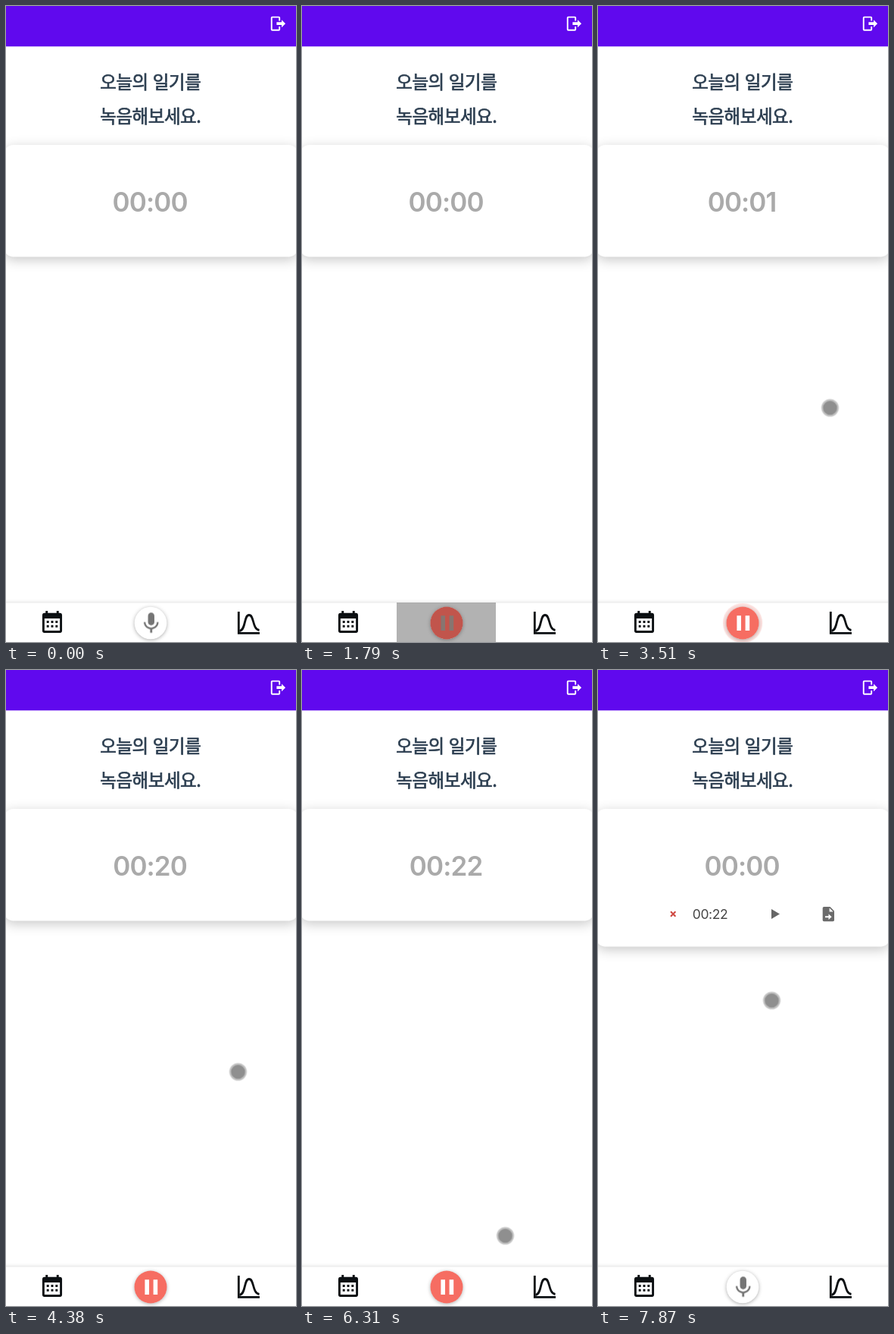
Recreate the animation shown at these times as an HTML page. Size 383 by 838 pixels, loop 8000 ms.

```html
<!DOCTYPE html>
<html lang="ko">
<head>
<meta charset="utf-8">
<title>음성 일기</title>
<style>
html, body { margin: 0; width: 100%; height: 100%; overflow: hidden; background: #fff; }
svg.stage { display: block; width: 100vw; height: 100vh; }

/* a thin stroke gives the regular weight a medium look */
.title {
  font: 400 23.5px "Noto Sans CJK KR", "Noto Sans CJK", sans-serif;
  letter-spacing: -.45px; fill: #2c3e50; stroke: #2c3e50; stroke-width: .7; text-anchor: middle;
}
.clock { font: 600 35px Inter, sans-serif; letter-spacing: -.9px; fill: #aaa; text-anchor: middle; }
.length { font: 400 17.5px Inter, sans-serif; letter-spacing: -.4px; fill: #444; text-anchor: middle; }
.card { fill: #fff; height: 147.5px; filter: drop-shadow(0 4px 8px rgba(0,0,0,.22)); }
.bar { fill: #fff; filter: drop-shadow(0 -1px 2px rgba(0,0,0,.12)); }
.knob { fill: #fff; filter: drop-shadow(0 1.5px 2.5px rgba(0,0,0,.33)); }

.card, .digits, .clip, .mic, .pause, .red, .press, .pulse, .cursor, .dot {
  animation: 8s linear infinite;
}
.card, .digits, .clip, .mic { animation-timing-function: step-end; }
.card { animation-name: grow; }
.digits { animation-name: count; }
.clip { animation-name: saved; }
.mic { animation-name: mic; fill: #757575; }
.pause { animation-name: pause; }
.red { animation-name: red; fill: #f66d62; }
.press { animation-name: press; }
.pulse { animation-name: pulse; fill: #f66d62; transform-origin: 191px 813px; }
.cursor { animation-name: move; }
.dot { animation-name: darken; }

@keyframes grow { 0% { height: 147.5px } 89.7%, 100% { height: 181.5px } }
@keyframes saved { 0% { opacity: 0 } 89.7%, 100% { opacity: 1 } }
@keyframes mic { 0% { opacity: 1 } 21% { opacity: 0 } 89.7%, 100% { opacity: 1 } }

/* 00:00, 00:01, then a jump to 00:19 */
@keyframes count {
  0% { transform: translateY(0) }
  34.7% { transform: translateY(-60px) }
  47.2% { transform: translateY(-120px) }
  54.7% { transform: translateY(-180px) }
  66.3% { transform: translateY(-240px) }
  78.8% { transform: translateY(-300px) }
  89.7%, 100% { transform: translateY(0) }
}
@keyframes pause {
  0%, 20.99% { opacity: 0; fill: #877570 }
  21%, 22.6% { opacity: 1; fill: #877570 }
  26%, 89.69% { opacity: 1; fill: #fff }
  89.7%, 100% { opacity: 0; fill: #fff }
}
@keyframes red {
  0%, 19.5% { opacity: 0 }
  21%, 90.7% { opacity: 1 }
  92.25%, 100% { opacity: 0 }
}
@keyframes press {
  0%, 18.2% { opacity: 0 }
  19%, 22.9% { opacity: .3 }
  26.5%, 88.9% { opacity: 0 }
  89% { opacity: .3 }
  92.25%, 100% { opacity: 0 }
}
@keyframes pulse {
  0%, 43.79% { opacity: 0; transform: scale(1) }
  43.8% { opacity: .2; transform: scale(1) }
  44.6% { opacity: .13; transform: scale(1.07) }
  45.5%, 100% { opacity: 0; transform: scale(1.08) }
}
@keyframes move {
  0%, 8.99% { transform: translate(-40px, -40px) }
  9% { transform: translate(320px, 748px) }
  10.6% { transform: translate(160px, 725px) }
  11.4% { transform: translate(119px, 724px) }
  13.3% { transform: translate(150px, 772px) }
  15.6%, 20% { transform: translate(190px, 810px) }
  21.5% { transform: translate(367px, 797px) }
  21.51%, 29.86% { transform: translate(-40px, -40px) }
  29.87% { transform: translate(366px, 579px) }
  31.4% { transform: translate(330px, 568px) }
  33.9%, 74.7% { transform: translate(306.5px, 529.5px) }
  75.5% { transform: translate(304px, 555px) }
  76.3% { transform: translate(305px, 610px) }
  77.1% { transform: translate(294px, 660px) }
  78% { transform: translate(286px, 700px) }
  78.8%, 79.2% { transform: translate(268.5px, 745.5px) }
  81% { transform: translate(228px, 790px) }
  83.9%, 91.5% { transform: translate(194px, 817px) }
  93.5% { transform: translate(205px, 755px) }
  96% { transform: translate(223px, 572px) }
  98.3%, 100% { transform: translate(229.5px, 435.5px) }
}
@keyframes darken {
  0%, 18.2% { fill: #8f8f8f; stroke: #c2c2c2 }
  18.3%, 20% { fill: #4a4242; stroke: #6a5652 }
  20.5%, 88.9% { fill: #8f8f8f; stroke: #c2c2c2 }
  89%, 91.3% { fill: #4a4242; stroke: #6a5652 }
  92.2%, 100% { fill: #8f8f8f; stroke: #c2c2c2 }
}
</style>
</head>
<body>
<svg class="stage" viewBox="0 0 383 838" preserveAspectRatio="none">
  <rect width="383" height="838" fill="#fff"/>

  <!-- header -->
  <rect width="383" height="53.3" fill="#6009ee"/>
  <path transform="translate(347.9 11.8) scale(.95)" fill="#fff" d="M17 17.25V14H10V10H17V6.75L22.25 12zM13 2a2 2 0 0 1 2 2V8H13V4H4V20H13V16H15V20a2 2 0 0 1-2 2H4a2 2 0 0 1-2-2V4a2 2 0 0 1 2-2z"/>

  <text class="title" x="190.8" y="109">오늘의 일기를</text>
  <text class="title" x="190.8" y="154">녹음해보세요.</text>

  <!-- recorder card -->
  <rect class="card" x="-3" y="183" width="389" rx="13"/>
  <svg x="90" y="230" width="203" height="60" overflow="hidden">
    <g class="digits clock">
      <text x="100.1" y="40.700">00:00</text>
      <text x="100.1" y="100.700">00:01</text>
      <text x="100.1" y="160.700">00:19</text>
      <text x="100.1" y="220.700">00:20</text>
      <text x="100.1" y="280.700">00:21</text>
      <text x="100.1" y="340.700">00:22</text>
    </g>
  </svg>
  <g class="clip">
    <path d="M96 318.3l6.4 6.4m0-6.4l-6.4 6.4" stroke="#cf4a43" stroke-width="2.1"/>
    <text class="length" x="148" y="327.7">00:22</text>
    <path d="M229 315v13l11-6.5z" fill="#666"/>
    <path d="M298.5 312h8l5.500 5.500v12a1.800 1.800 0 0 1-1.800 1.800h-11.700a1.800 1.800 0 0 1-1.800-1.800v-15.700a1.800 1.800 0 0 1 1.800-1.800z" fill="#6b6b6b"/>
    <path d="M305.600 313.400v5h5z" fill="#fff"/>
    <path d="M300 324.200h4.500v-2.700l4.200 3.700-4.200 3.700v-2.700H300z" fill="#fff"/>
  </g>

  <!-- bottom bar -->
  <rect class="bar" x="-5" y="786.5" width="393" height="60"/>
  <path transform="translate(43.6 795.5) scale(1.45)" fill="#0b0f12" d="M9 10v2H7v-2zm4 0v2h-2v-2zm4 0v2h-2v-2zM19 3a2 2 0 0 1 2 2v14a2 2 0 0 1-2 2H5a2 2 0 0 1-2-2V5a2 2 0 0 1 2-2h1V1h2v2h8V1h2v2zm0 16V8H5v11zM9 14v2H7v-2zm4 0v2h-2v-2zm4 0v2h-2v-2z"/>
  <g fill="none" stroke="#0b0f12" stroke-width="2.8">
    <path d="M307.300 798V826.300H335"/>
    <path d="M308.500 823.500C317 822 314 802.500 321 802.500S325 821 334.500 822.500"/>
  </g>

  <!-- record button -->
  <rect class="press" x="125" y="786" width="131" height="52"/>
  <circle class="pulse" cx="191" cy="813" r="26"/>
  <circle class="knob" cx="191" cy="813" r="21.300"/>
  <circle class="red" cx="191" cy="813" r="21.500"/>
  <circle class="press" cx="191" cy="813" r="21.500" fill-opacity=".72"/>
  <path class="pause" d="M183.400 803.300h5.600v19.600h-5.600zM194.600 803.300h5.600v19.600h-5.600z"/>
  <g transform="translate(174.900 796.500) scale(1.400)">
    <path class="mic" d="M12 14c1.660 0 3-1.340 3-3V5c0-1.660-1.340-3-3-3S9 3.340 9 5v6c0 1.660 1.340 3 3 3zm5.300-3c0 3-2.540 5.100-5.300 5.100S6.700 14 6.700 11H5c0 3.410 2.720 6.230 6 6.720V21h2v-3.280c3.280-.48 6-3.300 6-6.720z"/>
  </g>

  <g class="cursor"><circle class="dot" r="10.400" stroke-width="2.200"/></g>
</svg>
</body>
</html>
```
